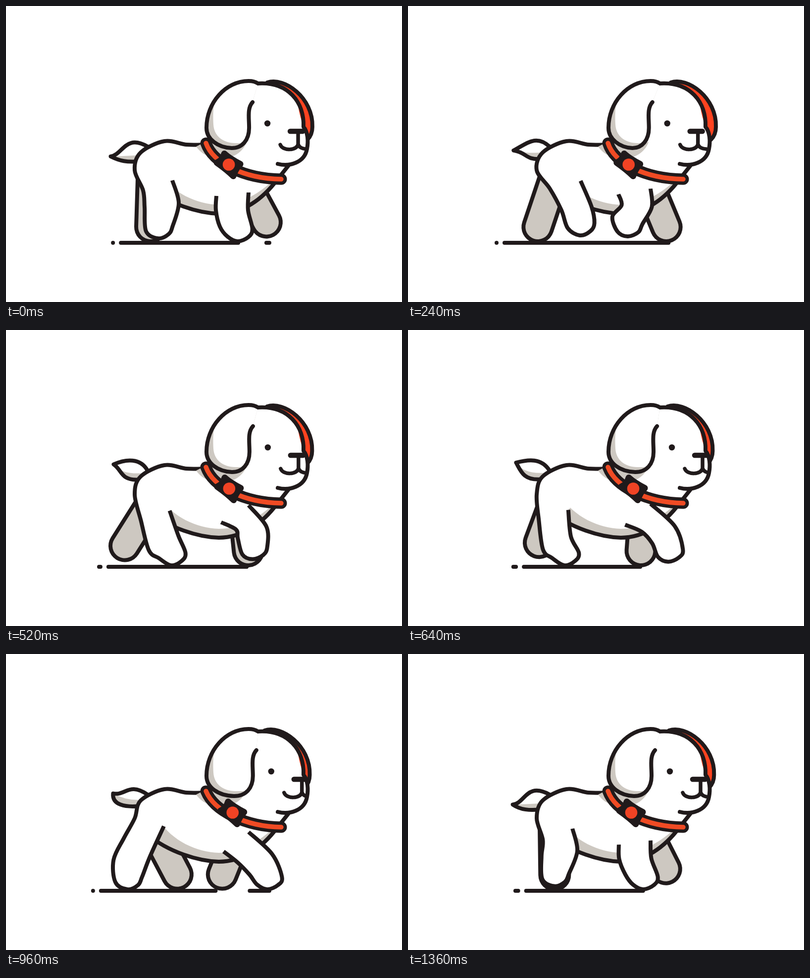
Write an HTML page with a canvas that moves like this. It is 800 px wide and 600 px high and loops after 1400 ms.

```html
<!DOCTYPE html>
<html lang="en">
<head>
<meta charset="utf-8">
<title>Walking puppy</title>
<style>
html, body { margin: 0; width: 100%; height: 100%; overflow: hidden; background: #fff; }
canvas { display: block; }
</style>
</head>
<body>
<canvas id="stage" width="800" height="600"></canvas>
<script>
const ctx = document.getElementById('stage').getContext('2d');
const INK = '#201a1b', GRAY = '#cdc8c1', RED = '#ff4320', COLLAR = '#f04b24';
const LOOP = 1400, STEP = 40, FOOT = 29, FLOOR = 448;
const { PI, sin, cos, max, min } = Math;

// Periodic motion: a mean plus a stride harmonic and a half-stride harmonic.
const waveAt = a => (mean, s1, c1, s2 = 0, c2 = 0) =>
  mean + s1 * sin(a) + c1 * cos(a) + s2 * sin(2 * a) + c2 * cos(2 * a);
const lift = (a, height, peak, power) => height * max(0, cos(a - peak)) ** power;

const frontStride = a => waveAt(a)(486, 31, 33, -4, 7);
const polar = ([x, y], degrees) =>
  [x + FOOT * cos(degrees * PI / 180), y + FOOT * sin(degrees * PI / 180)];
const paw = (foot, heel) => [heel, 92, 45, 8].map(angle => polar(foot, angle));

function nearHind(a) {
  const w = waveAt(a), swing = max(0, cos(a));
  const foot = [w(299.4, 55, 1.6, 3.8, 7), FLOOR - swing * (43 - 37 * swing)];
  return [
    [402, 281], [365, 281], [320, 274], [272, 297], [260, 333],
    [w(264, 22, 9, 1, 4), w(377, 0, -3, -7)],
    [w(265, 46.5, 8.5, 4, 6.5), w(423, 6, -16, -8, 1)],
    ...paw(foot, 150),
    [w(332, 37, 15, 0, 2), w(409, 2, -9.5)],
    [w(330, 13, 7, 4, -1), w(356, 5, -4, -4, 1.5)]
  ];
}

function nearFront(a) {
  const w = waveAt(a), raised = lift(a, 14, 1.85, 1);
  const foot = [frontStride(a + PI) + 9, FLOOR - raised];
  return [
    [w(432.5, -4.4, -7.5), w(391, -7.5, -6)],
    [w(451, -8, -25, -2, -2), w(413, -11, 1)],
    [foot[0] - 37 + raised / 2, foot[1] - 1 - raised],
    ...paw(foot, 138),
    [w(516, -12, -27), w(406, -3, 8)],
    [490, w(365, -1, 13)]
  ];
}

function farHind(a) {
  const x = waveAt(a)(291, -49, 4, 13, -3);
  return [295, 350, x, FLOOR - lift(a, 17, 3, 2)];
}

function farFront(a) {
  const x = frontStride(a);
  return [485 + 0.4 * (x - 495), 385, x, FLOOR - lift(a, 16, 5.6, 2)];
}

function spline(points) {
  const path = new Path2D(), last = points.length - 1;
  const at = k => points[max(0, min(last, k))];
  path.moveTo(...at(0));
  for (let k = 0; k < last; k++) {
    const [p, a, b, q] = [at(k - 1), at(k), at(k + 1), at(k + 2)];
    path.bezierCurveTo(a[0] + (b[0] - p[0]) / 6, a[1] + (b[1] - p[1]) / 6,
                       b[0] - (q[0] - a[0]) / 6, b[1] - (q[1] - a[1]) / 6, b[0], b[1]);
  }
  return path;
}

const shape = d => new Path2D(d);
function fill(path, color) {
  ctx.fillStyle = color;
  ctx.fill(path);
}
function stroke(path, width = 8, color = INK, cap = 'round') {
  ctx.lineWidth = width;
  ctx.strokeStyle = color;
  ctx.lineCap = cap;
  ctx.stroke(path);
}
function nearLeg(points) {
  const path = spline(points);
  fill(path, '#fff');
  stroke(path, 8, INK, 'butt');
}
function farLeg([hipX, hipY, x, y]) {
  const path = shape(`M${hipX} ${hipY} L${x} ${y}`);
  stroke(path, 2 * FOOT + 8);
  stroke(path, 2 * FOOT - 8, GRAY);
}
function clipped(path, draw) {
  ctx.save();
  ctx.clip(path);
  draw();
  ctx.restore();
}
function shifted(dx, dy, draw) {
  ctx.save();
  ctx.translate(dx, dy);
  draw();
  ctx.restore();
}
function dot(x, y, r, color) {
  ctx.beginPath();
  ctx.arc(x, y, r, 0, 2 * PI);
  ctx.fillStyle = color;
  ctx.fill();
}

const belly = 'C328 402 390 420 430 421 C478 421 518 392 548 352 L571 323';
const bodyFill = shape(`M402 281 C350 284 300 270 278 305 L285 365 ${belly} L450 270 Z`);
const bellyLine = shape(`M285 365 ${belly}`);
const bodyLight = shape('M402 281 C350 284 300 270 278 305 L310 338 C335 378 385 402 430 403 C470 403 505 385 537 356 L571 323 L450 270 Z');
const neckShadow = shape('M384 285 C395 300 410 308 432 309 C456 310 478 298 486 276 L402 276 Z');
const skull = 'M509 157 C570 153 603 195 601 245 C610 255 611 275 608 290 C603 318 572 326 549 320';
const headLine = shape(skull);
const headFill = shape(`${skull} L455 285 L455 170 Z`);
const backEar = shape('M528 155 C562 143 621 186 619 245 C619 258 614 266 609 271');
const earGlint = shape('M590 202 Q594 228 602 244 L602 225 Z');
const earLight = shape('M425 174 C418 200 418 225 419 240 C420 263 438 278 464 278 L515 278 L515 140 L425 140 Z');
const nose = shape('M574 254 L599 254');
const mouth = shape('M590 256 L590 280 M554 281 C558 294 588 294 590 280 C592 287 598 289 607 290');
const star = shape('M-9 -22 Q2 -12 23 -1 Q13 9 9 23 Q-3 11 -24 -4 Q-13 -8 -9 -22 Z');

// Footfalls of the front paws: a new ground dash appears, starts sliding, then joins the main line.
const footfalls = [
  { appear: 0, land: 200, join: 240 },
  { appear: 650, land: 960, join: 1230 }
];

function drawGround(t) {
  const line = (from, to) => stroke(shape(`M${from} 480 L${to + 0.01} 480`));
  const slide = land => 532 - max(0, t - land) / 7;

  const u = (t + 25) % 700, rise = max(0, (u - 400) / 300);
  const left = u < 400 ? 220 - 62 * u / 400 : 158 + 62 * rise;
  const dash = 6 * rise, start = left + dash + 16;

  const second = t >= footfalls[1].appear;
  const step = footfalls[+second];
  const previous = second ? footfalls[0].land : footfalls[1].land - LOOP;
  line(left, left + dash);
  if (t < step.join) {
    line(start, slide(previous));
    line(526 - 0.00035 * (t - step.appear) ** 2, slide(step.land));
  } else {
    line(start, slide(step.land));
  }
}

function drawTail(a) {
  const w = waveAt(a);
  const x = w(215, 0, -3.5), y = w(287, -3, 18);
  const endY = w(309, -2, 6), lowX = w(239.5, -5.7, 5.6);
  const top = `M286 285 C${w(254, 12, -13)} 259 ${x + 25} ${y + w(-4, -10, 0)} ${x} ${y}`;
  const outline = shape(`${top} C${x + w(12, 13, 6.5)} ${y + w(14, -9, -4.6)} ${lowX} ${endY + 2} 267 ${endY}`);
  fill(outline, GRAY);
  clipped(outline, () => fill(shape(`${top} Q${lowX} ${endY - 11} 274 ${endY - 13} Z`), '#fff'));
  stroke(outline);
}

function drawHead(turn) {
  shifted(-0.7 * turn, 0, () => {
    fill(backEar, RED);
    stroke(backEar);
  });
  fill(headFill, '#fff');
  fill(earGlint, RED);
  fill(neckShadow, GRAY);
  clipped(headLine, () => shifted(turn, 0, () => {
    stroke(mouth, 7.5);
    stroke(nose, 10.5);
  }));
  stroke(headLine);
  dot(528 + turn, 238, 6.2, INK);

  const ear = shape(`M${498 + turn} 195 C${487 + turn} 207 ${491 + turn} 226 ${491 + turn} 247 `
    + `C${491 + turn} 272 ${477 + turn} 288 ${456 + turn * 0.6} 288 C428 287 405 270 405 247 C405 196 444 152 490 152 Q502 152 509 157`);
  fill(ear, GRAY);
  clipped(ear, () => fill(earLight, '#fff'));
  stroke(ear);
}

function drawCollar(turn) {
  const strap = shape(`M404 278 C${418 + turn * 0.3} 318 ${480 + turn * 0.5} 350 556 351`);
  stroke(strap, 23);
  stroke(strap, 9.5, COLLAR);
  shifted(450 + turn, 321.5, () => {
    fill(star, INK);
    stroke(star, 13);
    dot(0, 0, 12.3, '#f04324');
  });
}

function draw(t) {
  const a = 2 * PI * t / LOOP;
  const turn = waveAt(a)(2.4, -5.2, -3.3, 0, 1);
  ctx.fillStyle = '#fff';
  ctx.fillRect(0, 0, 800, 600);
  ctx.lineJoin = 'round';
  drawGround(t);
  farLeg(farHind(a));
  farLeg(farFront(a));
  drawTail(a);
  fill(bodyFill, GRAY);
  fill(bodyLight, '#fff');
  stroke(bellyLine);
  nearLeg(nearHind(a));
  nearLeg(nearFront(a));
  drawHead(turn);
  drawCollar(turn);
}

const begin = performance.now();
function tick() {
  const t = (performance.now() - begin) % LOOP;
  draw(Math.floor(t / STEP) * STEP);
  requestAnimationFrame(tick);
}
tick();
</script>
</body>
</html>
```
